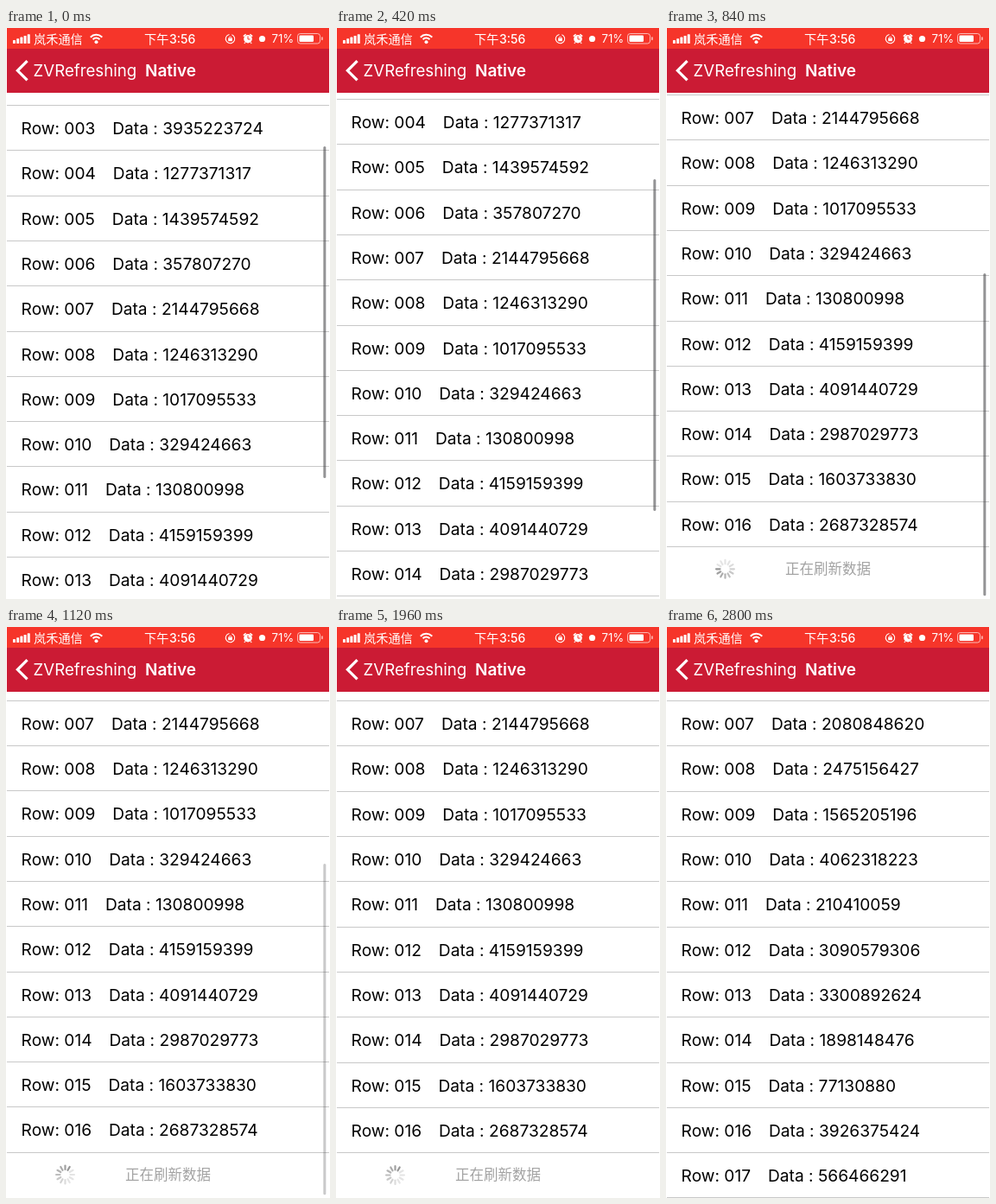
These frames come from a looping animation (375x661 px, 2940 ms). An HTML page with a canvas:

```html
<!DOCTYPE html>
<html lang="zh">
<head>
<meta charset="utf-8">
<title>Native</title>
<style>
html, body { margin: 0; width: 100%; height: 100%; overflow: hidden; background: #fff; }
canvas { display: block; width: 375px; height: 661px; }
</style>
</head>
<body>
<canvas id="stage" width="375" height="661"></canvas>
<script>
const ctx = document.getElementById('stage').getContext('2d');
const W = 375, H = 661, LOOP = 2940, STEP = 140;
const ROW_H = 52.3, FIRST = 3, FIRST_Y = 116;
const REST = 213, RELOAD = 2800;
const LATIN = 'Inter, Roboto, sans-serif';
const CJK = '"Noto Sans CJK SC", "Noto Sans CJK", sans-serif';
const ROW_FONT = '19.15px ' + LATIN;

// Row texts before and after the reload
const before = `3935223724 1277371317 1439574592 357807270 2144795668 1246313290 1017095533
  329424663 130800998 4159159399 4091440729 2987029773 1603733830 2687328574`.split(/\s+/);
const after = `2080848620 2475156427 1565205196 4062318223 210410059 3090579306
  3300892624 1898148476 77130880 3926375424 566466291`.split(/\s+/);

// Steady drag, then a flick past the end, then a springy return
function scrollAt(t) {
  const drag = s => Math.max(0, (s - 121) * 0.198);
  if (t <= 560) return drag(t);
  if (t <= 840) {
    const k = (t - 560) / 280;
    return drag(560) + (221.2 - drag(560)) * Math.sin(k * Math.PI / 2) ** 0.5 * k ** 0.4;
  }
  return REST + 8.2 * Math.exp((840 - t) / 100);
}

function text(s, x, y, font, color) {
  ctx.font = font;
  ctx.fillStyle = color;
  ctx.fillText(s, x, y);
}

function box(x, y, w, h, r, color) {
  ctx.fillStyle = color;
  ctx.beginPath();
  ctx.roundRect(x, y, w, h, r);
  ctx.fill();
}

function line(points, width, color) {
  ctx.strokeStyle = color;
  ctx.lineWidth = width;
  ctx.beginPath();
  points.forEach(([x, y]) => ctx.lineTo(x, y));
  ctx.stroke();
}

function arc(x, y, r, a, b, width, color) {
  ctx.strokeStyle = color;
  ctx.lineWidth = width;
  ctx.beginPath();
  ctx.arc(x, y, r, a, b);
  ctx.stroke();
}

function dot(x, y, r, color) {
  ctx.fillStyle = color;
  ctx.beginPath();
  ctx.arc(x, y, r, 0, 7);
  ctx.fill();
}

const rowY = (row, offset) => FIRST_Y + (row - FIRST) * ROW_H - offset;

function drawRows(data, first, offset) {
  for (let i = 0; i <= data.length; i++) {
    box(1, Math.round(rowY(first + i, offset) - 27), 373, 1, 0, '#c8c8c8');
  }
  data.forEach((value, i) => {
    const row = first + i;
    const y = Math.round(rowY(row, offset) + 7);
    const label = 'Row: ' + String(row).padStart(3, '0');
    text(label, 17.6, y, ROW_FONT, '#000');
    const x = 17.6 + ctx.measureText(label).width + 20;
    text('Data : ' + value, x, y, ROW_FONT, '#000');
  });
}

function drawFooter(offset, step) {
  const y = rowY(17, offset) - 0.7;
  ctx.lineCap = 'round';
  for (let i = 0; i < 12; i++) {
    const a = i * Math.PI / 6 - Math.PI / 2;
    const age = (step * 2 + 21 - i) % 12;
    const shade = Math.min(228, 150 + age * 10);
    const at = r => [68.5 + r * Math.cos(a), y + r * Math.sin(a)];
    line([at(6), at(10.4)], 2.2, `rgb(${shade},${shade},${shade})`);
  }
  ctx.lineCap = 'butt';
  text('正在刷新数据', 138, Math.round(y + 6), '16.5px ' + CJK, '#a2a2a2');
}

function drawBar(offset, alpha) {
  const over = Math.max(0, offset - REST);
  const top = 137 + Math.min(offset, REST) * 0.64 + over * 1.3;
  box(367.3, top, 3, 384 - over * 1.3, 1.5, `rgba(60,60,64,${0.55 * alpha})`);
}

function drawStatus() {
  box(1, 0, 373, 24, 0, '#f6352a');
  for (let i = 0; i < 5; i++) box(8 + i * 4.2, 14 - i * 1.7, 3, 4 + i * 1.7, 0.6, '#fff');
  text('岚禾通信', 32, 17.5, '300 14.2px ' + CJK, '#fff');

  dot(104.5, 16.2, 2, '#fff');
  for (const r of [5.4, 9.2]) arc(104.5, 17, r, -Math.PI * 0.76, -Math.PI * 0.24, 2, '#fff');

  text('下午', 160, 17.5, '500 14.2px ' + CJK, '#fff');
  text('3:56', 189, 17.5, '500 14px ' + LATIN, '#fff');

  // Rotation lock
  arc(259.5, 12.5, 5.2, -1.2, 4.5, 1.1, '#fff');
  box(257.2, 11.8, 4.6, 3.4, 0.5, '#fff');
  arc(259.5, 11.8, 1.5, Math.PI, Math.PI * 2, 0.9, '#fff');

  // Alarm clock
  dot(280, 12.7, 4.8, '#fff');
  line([[280, 9.5], [280, 13], [282.6, 13]], 1, '#f6352a');
  for (const side of [-1, 1]) {
    line([[280 + side * 5.2, 9.6], [280 + side * 2.4, 7.2]], 1.5, '#fff');
    line([[280 + side * 3, 16.5], [280 + side * 4.2, 18]], 1.2, '#fff');
  }

  dot(296.5, 12.5, 3.6, '#fff');
  text('71%', 307.5, 17, '13.2px ' + LATIN, '#fff');

  // Battery
  ctx.strokeStyle = 'rgba(255,255,255,.65)';
  ctx.lineWidth = 1;
  ctx.beginPath();
  ctx.roundRect(337.5, 6.5, 26, 11.5, 3);
  ctx.stroke();
  box(339.5, 8.5, 16.5, 7.5, 1.2, '#fff');
  box(365, 10.2, 1.7, 4, 1, 'rgba(255,255,255,.65)');
}

function drawNav() {
  box(1, 24, 373, 51, 0, '#cb1b34');
  line([[24.6, 38.2], [13.4, 49.3], [24.6, 60.4]], 3.2, '#fff');
  text('ZVRefreshing', 31.5, 56, '18.7px ' + LATIN, '#fff');
  text('Native', 161, 56, '600 19px ' + LATIN, '#fff');
}

function draw(now) {
  const step = Math.floor((now % LOOP) / STEP);
  const t = step * STEP;
  const offset = scrollAt(t);
  ctx.fillStyle = '#fff';
  ctx.fillRect(0, 0, W, H);
  if (t < RELOAD) {
    drawRows(before, FIRST, offset);
    drawFooter(offset, step);
  } else {
    drawRows(after, 7, offset);
  }
  const alpha = Math.min(1, (1260 - t) / 280);
  if (alpha > 0) drawBar(offset, alpha);
  drawNav();
  drawStatus();
}

const start = performance.now();
function tick() {
  draw(performance.now() - start);
  requestAnimationFrame(tick);
}
tick();
</script>
</body>
</html>
```
